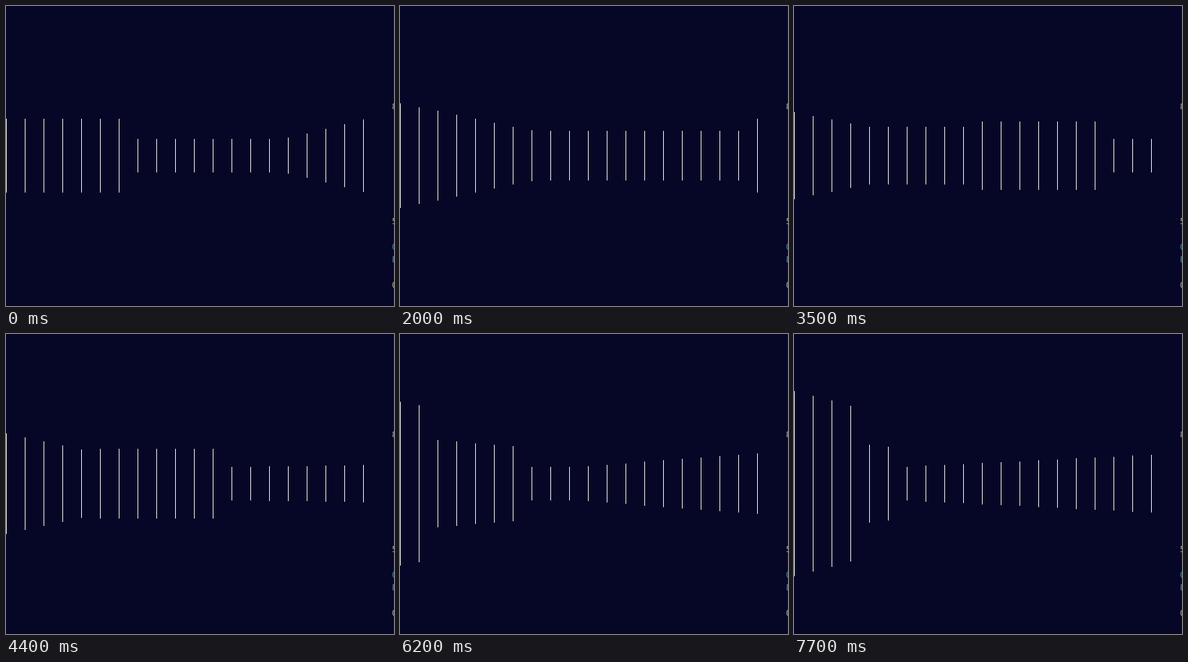
Recreate the animation shown at these times as an HTML page with a canvas. Size 578 px wide and 447 px high, loop 8 s.

```html
<!DOCTYPE html>
<html>
<head>
<meta charset="utf-8">
<style>
html, body { margin: 0; height: 100%; overflow: hidden; background: #060626; }
canvas { display: block; }
</style>
</head>
<body>
<canvas id="view" width="578" height="447"></canvas>
<script>
const ctx = document.getElementById('view').getContext('2d');
const LOOP = 8000, COLUMNS = 20, GAP = 28, BACK = 25;

// A pillar ends at column `edge`. Right of it the back wall climbs after `gap`;
// left of it another wall stays level for `reach` columns, then climbs by `pitch`.
const poses = [];
function pose(step, changes) {
  const last = poses[poses.length - 1];
  poses.push({ ...last, ...changes, step });
}
pose(0, { edge: 6.4, width: 7, front: 55.5, lean: 0, far: 49, reach: 0, pitch: 5.8, gap: 8.3, rise: 6.8 });
pose(9, { edge: 25.2, width: 6.8, far: 37.5, reach: 11.3 });
pose(12, { edge: 30.7 });
pose(16, { edge: 20.5, front: 51.5, reach: 10.5 });
pose(22, { edge: 11.5, width: 7, front: 52, far: 49, reach: 0, gap: 0, rise: 0.4 });
pose(27, { edge: 5.5, width: 6.5, front: 54, lean: 1, far: 107, gap: 6.3, rise: 3.83 });
pose(34, { edge: 6.5, width: 5, front: 55, lean: 2.3, far: 114.5, pitch: 5, gap: 2.7, rise: 2.1 });
pose(39, { edge: 14.5, width: 2, front: 54, lean: 3, far: 113, pitch: 7.3, gap: 0, rise: 1.36 });
pose(41, { edge: 12.2 });
pose(43, { edge: 5.5 });

// The view moves one step per 100 ms inside each burst.
const bursts = [[800, 900], [1300, 1600], [1800, 2300], [2600, 2900], [3300, 3500],
  [4000, 4100], [4400, 4600], [4800, 5000], [5300, 5500], [5900, 6400],
  [6600, 6800], [7200, 7300], [7600, 7700]];

function stepAt(t) {
  return bursts.reduce((n, [from, to]) =>
    t < from ? n : n + Math.floor((Math.min(t, to) - from) / 100) + 1, 0);
}

function poseAt(step) {
  const i = Math.max(1, poses.findIndex(p => p.step >= step));
  const a = poses[i - 1], b = poses[i];
  const part = (step - a.step) / (b.step - a.step);
  const mix = {};
  for (const key in a) mix[key] = a[key] + (b[key] - a[key]) * part;
  return mix;
}

// Half the wall height seen in column x.
function halfHeight(x, p) {
  const u = x - p.edge;
  if (u > 0) return BACK + p.rise * Math.max(0, u - p.gap);
  if (u > -p.width) return p.front - p.lean * u;
  return p.far + p.pitch * Math.max(0, -u - p.width - p.reach);
}

// Text at the right border, of which only the first pixels are visible.
function drawEdge(t) {
  ctx.fillStyle = '#15160f';
  ctx.fillRect(577, 0, 1, 447);
  ctx.font = '12px "DejaVu Sans Mono", monospace';
  ctx.textBaseline = 'middle';
  const mark = (char, y, color) => {
    ctx.fillStyle = color;
    ctx.fillText(char, 575, y);
  };
  mark('8', 151, '#b4b4a8');
  mark('5', 322, '#c0bb58');
  mark('0', 360, '#3c95a8');
  mark('E', 379, '#3c95a8');
  mark('0', 417, t < 500 ? '#c0bb58' : '#b4b4a8');
}

function draw(now) {
  const t = now % LOOP;
  const p = poseAt(stepAt(t));
  ctx.fillStyle = '#060626';
  ctx.fillRect(0, 0, 578, 447);
  ctx.fillStyle = '#fff';
  for (let i = 0; i < COLUMNS; i++) {
    const top = Math.round(223.4 - halfHeight(i, p));
    ctx.fillRect(i * GAP, top, 1, 446 - 2 * top);
  }
  drawEdge(t);
}

const begin = performance.now();
function tick() {
  draw(performance.now() - begin);
  requestAnimationFrame(tick);
}
tick();
</script>
</body>
</html>
```
